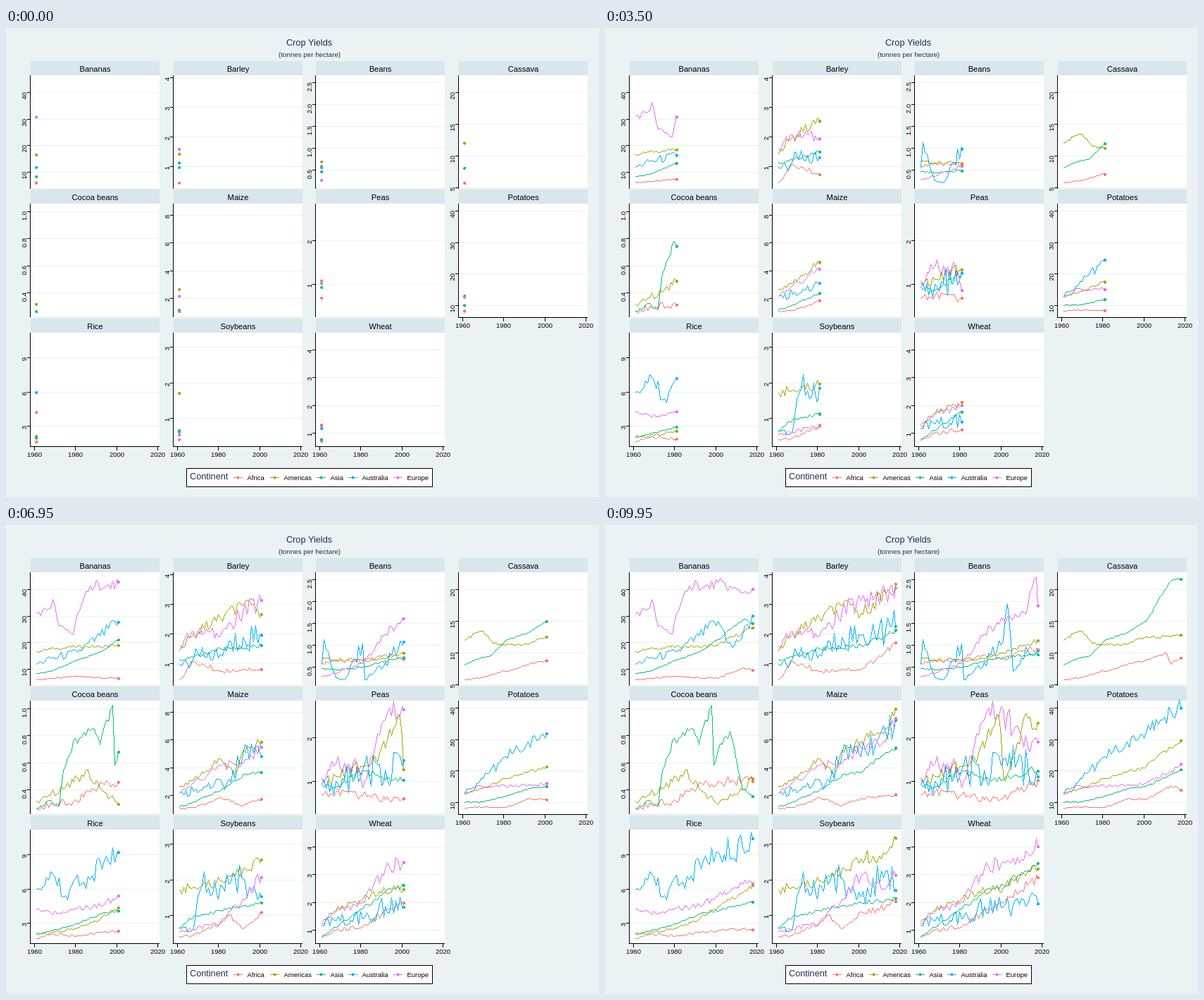
These frames come from a looping animation (842x665 px, 10 s). An HTML page with a canvas:

```html
<!DOCTYPE html>
<html lang="en">
<head>
<meta charset="utf-8">
<title>Crop Yields</title>
<style>
html, body { margin: 0; width: 100%; height: 100%; overflow: hidden; background: #eaf2f3; }
canvas { display: block; width: 842px; height: 665px; }
</style>
</head>
<body>
<canvas id="stage" width="842" height="665"></canvas>
<script>
const ctx = document.getElementById('stage').getContext('2d');
const FRAMES = 200, STEP = 50, LAST = 57;
const YEAR_PX = 2.924, FIRST_X = 8.3, WIDTH = 183, HEIGHT = 160;
const BG = '#eaf2f3', STRIP = '#d9e6eb', NAVY = '#1e2d53';
const CONTINENTS = ['Africa', 'Americas', 'Asia', 'Australia', 'Europe'];
const COLORS = ['#f8766d', '#a3a500', '#00bf7d', '#00b0f6', '#e76bf3'];
const SWING = [1, .9, .5, 2.6, 1.1];
// Years since 1961 at which each trend is given.
const KNOTS = [0, 7, 20, 31, 40, 52, 57];
const LEFT = [35, 238, 440, 643], TOP = [67, 249, 432];
const crops = [];

const noise = seed => {
  const s = Math.sin(seed * 12.9898) * 43758.5453;
  return (s - Math.floor(s)) * 2 - 1;
};

// Yearly values: straight between knots, with seeded swings in the years between.
function yearly(trend, extra, rough, seed) {
  const points = { ...extra };
  trend.forEach((v, i) => points[KNOTS[i]] = v);
  const years = Object.keys(points).map(Number);
  const out = [];
  years.slice(1).forEach((t1, i) => {
    const t0 = years[i], v0 = points[t0], dv = points[t1] - v0;
    out.push(v0);
    for (let t = t0 + 1; t < t1; t++) {
      out.push((v0 + dv * (t - t0) / (t1 - t0)) * (1 + rough * noise(seed + t)));
    }
  });
  return [...out, points[LAST]];
}

// axis: first tick, step, count, y of the first tick, pixels per step
function addCrop(name, axis, rough, trends, extras = {}) {
  const i = crops.length;
  const [first, step, count, y0, gap] = axis;
  const left = LEFT[i % 4];
  crops.push({
    name, left,
    top: TOP[Math.floor(i / 4)],
    ticks: Array.from({ length: count }, (_, k) => (first + k * step).toFixed(step < 1 ? 1 : 0)),
    x: t => left + FIRST_X + t * YEAR_PX,
    y: v => y0 - (v - first) / step * gap,
    hasYears: i >= 7,
    curves: trends.map((trend, k) =>
      yearly(trend, extras[CONTINENTS[k]], rough * SWING[k], i * 977 + k * 101)),
  });
}

addCrop('Bananas', [10, 10, 4, 204, 37.7], .04, [
  [6, 6.3, 7.3, 6.6, 6.5, 10.4, 9.5],
  [16.5, 17.5, 18.4, 18.3, 19, 23.8, 25.5],
  [8.3, 9, 13.3, 16.3, 21, 28.5, 27.2],
  [11.8, 13.8, 16.3, 22.3, 28, 22.5, 30],
  [30.7, 33, 30.7, 39.5, 42.5, 38.5, 40],
], { Europe: { 8: 36, 11: 26, 18: 23, 25: 39, 29: 43.3 }, Australia: { 47: 18 } });
addCrop('Barley', [1, 1, 4, 196, 42], .1, [
  [.45, 1.05, .72, .8, .8, 1.37, 1.7],
  [1.42, 2, 2.53, 2.95, 2.68, 3.35, 3.68],
  [1.12, 1.2, 1.5, 1.52, 1.6, 1.93, 2.12],
  [.97, 1.2, 1.3, 1.88, 1.95, 2.15, 2.25],
  [1.58, 2.05, 1.92, 2.75, 3.1, 3.4, 3.55],
]);
addCrop('Beans', [.5, .5, 5, 201, 31], .08, [
  [.59, .63, .63, .78, .68, .88, .9],
  [.69, .66, .65, .69, .82, 1.03, 1.1],
  [.46, .43, .48, .63, .72, .77, .78],
  [.55, .25, 1.02, .6, 1.1, .87, .87],
  [.27, .35, .58, 1.25, 1.6, 1.88, 1.9],
], { Australia: { 1: 1.12, 11: .2, 21: .2, 42: 1.95, 45: .4 }, Europe: { 56: 2.55 } });
addCrop('Cassava', [5, 5, 4, 226, 45], .02, [
  [5.7, 6, 7.1, 8.1, 8.8, 8.2, 9.2],
  [12, 13.3, 11.2, 11.3, 12.5, 12.5, 12.8],
  [8.1, 9.1, 11.9, 13.2, 15, 21.3, 21.6],
], { Africa: { 50: 10 }, Americas: { 9: 13.4, 14: 11.4 }, Asia: { 12: 9.4 } });
addCrop('Cocoa beans', [.4, .2, 4, 375, 38.4], .09, [
  [.26, .3, .31, .45, .46, .47, .46],
  [.315, .36, .485, .41, .29, .4, .48],
  [.26, .32, .74, .73, .69, .4, .35],
], { Americas: { 24: .54 }, Asia: { 11: .28, 13: .54, 18: .76, 27: .85, 37: 1.02, 38: .58, 46: .83 } });
addCrop('Maize', [2, 2, 4, 383, 39.4], .07, [
  [1.05, 1.1, 1.85, 1.25, 1.75, 1.95, 2.05],
  [2.65, 3.1, 4.6, 5.2, 5.9, 6.8, 8.2],
  [1.15, 1.5, 2.35, 3.45, 3.65, 5.05, 5.4],
  [2.15, 2.3, 3.1, 4.95, 4.75, 6.5, 7.4],
  [2.15, 2.9, 4.1, 4.25, 5.4, 5.9, 7.55],
], { Americas: { 27: 3.5 }, Australia: { 22: 2.4 } });
addCrop('Peas', [1, 1, 2, 363, 62], .14, [
  [.68, .73, .68, .58, .6, .93, 1.02],
  [1.02, 1.1, 1.33, 1.75, 1.1, 2.45, 2.33],
  [.93, .87, 1.25, 1.02, 1.03, 1.23, 1.23],
  [.93, 1, 1.25, 1.25, 1.5, 1.3, 1.1],
  [1.08, 1.4, .85, 2.4, 2.63, 1.75, 1.9],
], { Americas: { 38: 2.5, 41: 1 }, Europe: { 18: 1.3 } });
addCrop('Potatoes', [10, 10, 4, 393, 44.6], .03, [
  [8.2, 8.5, 8.4, 11, 10.8, 15.2, 13.9],
  [13, 14, 17.4, 19.5, 21.4, 27.4, 29.7],
  [10, 10, 11.8, 14.3, 15, 18.8, 20.4],
  [12.8, 16.2, 24.4, 29.1, 32.3, 39, 40],
  [12.5, 15.2, 15, 15.4, 16.1, 19.7, 22.2],
]);
addCrop('Rice', [3, 3, 3, 564, 48.5], .05, [
  [1.6, 2, 1.85, 2.15, 2.3, 2.45, 2.4],
  [2.1, 2.1, 2.55, 3.3, 4.4, 5.6, 6.3],
  [1.95, 2.3, 2.9, 3.75, 4.05, 4.65, 4.85],
  [5.95, 7.5, 7.2, 8.5, 9.2, 9.6, 10.4],
  [4.2, 3.9, 4.25, 4.5, 5.4, 6.4, 6.45],
], { Australia: { 14: 5.4, 24: 6 } });
addCrop('Soybeans', [1, 1, 3, 553, 50.4], .09, [
  [.4, .43, .78, .62, 1.08, 1.2, 1.38],
  [1.7, 1.78, 1.97, 2.3, 2.58, 2.7, 3.17],
  [.65, .95, 1.12, 1.27, 1.35, 1.42, 1.47],
  [.62, .63, 1.85, 2.05, 1.5, 2.25, 1.7],
  [.53, .6, .8, 1.45, 2.1, 1.75, 2.13],
], { Africa: { 24: 1 }, Australia: { 11: 1.85 } });
addCrop('Wheat', [1, 1, 4, 574, 39.4], .08, [
  [.7, .98, 1.12, 1.7, 1.95, 2.6, 2.88],
  [1.3, 1.7, 2.1, 2.42, 2.5, 3.15, 3.2],
  [.77, 1.1, 1.75, 2.35, 2.6, 3.1, 3.4],
  [1.17, 1.32, 1.4, 1.85, 1.82, 1.95, 1.95],
  [1.25, 1.65, 2, 3.2, 3.45, 3.75, 4],
]);

function rect(x, y, w, h, color) {
  ctx.fillStyle = color;
  ctx.fillRect(x, y, w, h);
}

function text(str, x, y, size, { color = '#000', align = 'center', turn = 0 } = {}) {
  ctx.save();
  ctx.translate(x, y);
  ctx.rotate(turn);
  ctx.font = `${size}px "Liberation Sans", Arial, sans-serif`;
  ctx.textAlign = align;
  ctx.fillStyle = color;
  ctx.fillText(str, 0, 0);
  ctx.restore();
}

// Hard-edged one-pixel line.
function line(...ends) {
  const [x0, y0, x1, y1] = ends.map(Math.floor);
  const n = Math.max(Math.abs(x1 - x0), Math.abs(y1 - y0), 1);
  for (let i = 0; i <= n; i++) {
    ctx.fillRect(Math.round(x0 + (x1 - x0) * i / n), Math.round(y0 + (y1 - y0) * i / n), 1, 1);
  }
}

function dot(cx, cy, color) {
  ctx.fillStyle = color;
  for (let y = Math.floor(cy) - 2; y <= cy + 2; y++)
    for (let x = Math.floor(cx) - 2; x <= cx + 2; x++)
      if (Math.hypot(x + .5 - cx, y + .5 - cy) < 2.1) ctx.fillRect(x, y, 1, 1);
}

function drawPanel({ name, left, top, ticks, x, y, hasYears, curves }, now) {
  const bottom = top + HEIGHT;
  rect(left, top - 20, WIDTH, 20, STRIP);
  rect(left, top, WIDTH, HEIGHT, '#fff');
  text(name, left + WIDTH / 2, top - 5, 11.2);
  ticks.forEach(label => {
    const ty = Math.round(y(+label));
    rect(left, ty, WIDTH, 1, BG);
    rect(left - 5, ty, 5, 1, '#000');
    text(label, left - 6, ty, 9.5, { align: 'right', turn: -Math.PI / 2 });
  });

  const whole = Math.floor(now), part = now - whole;
  const tips = curves.map((v, k) => {
    const end = part ? v[whole] + (v[whole + 1] - v[whole]) * part : v[whole];
    ctx.fillStyle = COLORS[k];
    for (let t = 0; t < now; t++) {
      const next = Math.min(t + 1, now);
      line(x(t), y(v[t]), x(next), y(next < t + 1 ? end : v[next]));
    }
    return end;
  });
  tips.forEach((v, k) => dot(x(now), y(v) + .5, COLORS[k]));

  rect(left - 1, top, 1, HEIGHT + 1, '#000');
  if (!hasYears) return;
  rect(left - 1, bottom + 1, WIDTH + 1, 1, '#000');
  for (let year = 1960; year <= 2020; year += 20) {
    const tx = Math.floor(x(year - 1961));
    rect(tx, bottom + 1, 1, 6, '#000');
    text(year, tx + .5, bottom + 16, 9.5);
  }
}

function drawLegend() {
  rect(256, 624, 350, 27, '#000');
  rect(257, 625, 348, 25, '#fff');
  text('Continent', 261, 640, 12.7, { color: NAVY, align: 'left' });
  [329, 381, 447, 492, 556].forEach((x, k) => {
    rect(x - 6, 637, 13, 1, COLORS[k]);
    dot(x + .5, 637.5, COLORS[k]);
    text(CONTINENTS[k], x + 13.5, 641, 9.5, { align: 'left' });
  });
}

function draw(frame) {
  rect(0, 0, 842, 665, BG);
  text('Crop Yields', 430.5, 25, 12.7, { color: NAVY });
  text('(tonnes per hectare)', 431, 41, 9.8, { color: NAVY });
  const now = frame * LAST / (FRAMES - 1);
  crops.forEach(crop => drawPanel(crop, now));
  drawLegend();
}

const start = performance.now();
let shown = -1;
function tick() {
  const frame = Math.floor((performance.now() - start) / STEP) % FRAMES;
  if (frame !== shown) draw(shown = frame);
  requestAnimationFrame(tick);
}
tick();
</script>
</body>
</html>
```
